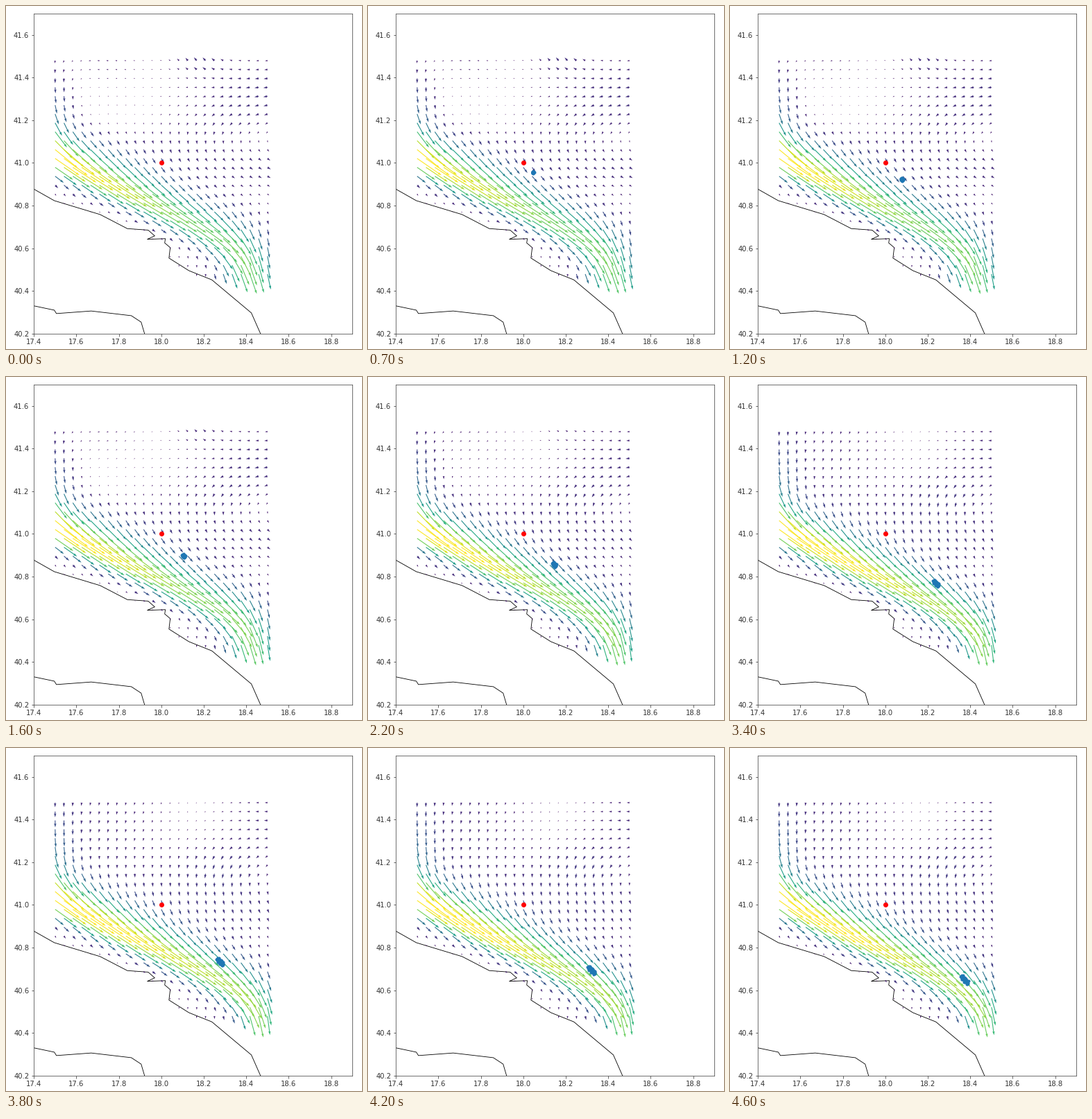
A matplotlib script that plays this animation: 513x495 px, repeating every 4700 ms.

```python
import numpy as np
import matplotlib.pyplot as plt
from matplotlib.animation import FuncAnimation
from matplotlib.path import Path

W, H, DPI = 513, 495, 72
FRAMES, STEP = 47, 100
LEFT, BASE, SPAN_X, SPAN_Y = 40.2, 472.8, 459, 462
LON0, LAT0, SIZE = 17.4, 40.2, 1.5

COAST = [(17.4, 40.877), (17.496, 40.823), (17.712, 40.758), (17.84, 40.692),
         (17.938, 40.685), (17.969, 40.658), (17.934, 40.642),
         (18.019, 40.645), (18.016, 40.625), (18.042, 40.603),
         (18.036, 40.554), (18.13, 40.495), (18.238, 40.452),
         (18.424, 40.297), (18.467, 40.2)]
GULF = [(17.4, 40.33), (17.496, 40.31), (17.506, 40.294), (17.67, 40.306),
        (17.859, 40.284), (17.905, 40.254), (17.921, 40.2)]


def to_geo(x, y):
    """Stage pixels (y down) to longitude and latitude."""
    return (LON0 + (x - LEFT) * SIZE / SPAN_X,
            LAT0 + (BASE - y) * SIZE / SPAN_Y)


def to_stage(lon, lat):
    return (LEFT + (lon - LON0) * SPAN_X / SIZE
            + 1j * (BASE - (lat - LAT0) * SPAN_Y / SIZE))


def mix(a, b, w):
    return a + (b - a) * w


# Sea points of a 1/24 degree grid
steps = np.arange(25) / 24
gu, gv = (a.ravel() for a in np.meshgrid(steps, steps))
lon, lat = 17.5 + gu, 41.479 - gv
land = Path(COAST + [(LON0, LAT0)])
sea = ~land.contains_points(np.column_stack([lon, lat + 0.005]))
gu, gv, lon, lat = gu[sea], gv[sea], lon[sea], lat[sea]
grid = to_stage(lon, lat)


def bump(u, v, su, sv):
    return np.exp(-((gu - u) / su) ** 2 / 2 - ((gv - v) / sv) ** 2 / 2)


# Weak surrounding currents as right + down * 1j, in pixels
common = ((1 + 10j) * bump(0, .22, .07, .16)
          + (1 + 4j) * bump(1, .87, .2, .13)
          + (-.5 + 3j) * bump(.75, .95, .2, .15)
          + (1 + 2j) * bump(.1, .62, .15, .06))
early = common + (-3 * bump(.22, 0, .15, .1)
                  + (-2 - 5j) * bump(.68, 0, .1, .06)
                  + (-6 + .5j) * bump(1, .15, .3, .15)
                  + (-1 + 3j) * bump(.75, .3, .2, .1)
                  + (2 + 4j) * bump(.45, .43, .3, .1)
                  + (5 + 2j) * bump(1, .5, .25, .1))
late = common + ((-1 + 5j) * bump(.25, .1, .25, .25)
                 - 5 * bump(1, .1, .2, .15)
                 + (-2 + 4j) * bump(.8, .28, .15, .08)
                 + (1 + 5j) * bump(.65, .45, .3, .13)
                 + (2 + 3j) * bump(1, .5, .2, .1))

S = np.arange(0, 460, 1.5)


def flow(w):
    """Coastal jet along a bending centre line, plus the weak currents."""
    bend = 1 / (1 + np.exp((mix(325, 355, w) - S) / mix(14, 18, w)))
    heading = np.radians(mix(26, mix(66, 86, w), bend))
    axis = 40 + 203j + 1.5 * np.cumsum(np.exp(1j * heading))
    force = 41 - 17 * (S / 420) ** mix(1, 2.2, w)

    gap = grid[:, None] - axis
    near = abs(gap).argmin(axis=1)
    gap = gap[np.arange(len(near)), near]
    inshore = (np.exp(-1j * heading[near]) * gap).imag > 0
    dist = abs(gap)
    inner = 17 + mix(11, 4, w) * bend[near]
    width = np.where(inshore, inner, 29)
    # Offshore water veers towards the coast
    veer = np.radians(4) + np.where(inshore, 0, 0.006 * np.minimum(dist, 60))
    jet = force[near] * np.exp(-0.5 * (dist / width) ** 2)
    return jet * np.exp(1j * (heading[near] + veer)) + mix(early, late, w)


rng = np.random.default_rng(4)
cloud = np.clip(rng.normal(size=(2, 80)), -2.1, 2.1)


def particles(t):
    """Drifting cloud that speeds up and stretches along its path."""
    mid = 224 + 226j + (20 + 20j) * t + (4.8 + 3.5j) * t * (t / 4.6) ** 4
    along, across = 0.8 * t, 1.4 * (1 - np.exp(-t))
    p = mid + (along * cloud[0] + 1j * across * cloud[1]) * np.exp(0.85j)
    return np.column_stack(to_geo(p.real, p.imag))


fig = plt.figure(figsize=(W / DPI, H / DPI), dpi=DPI, facecolor="white")
ax = fig.add_axes([LEFT / W, 1 - BASE / H, SPAN_X / W, SPAN_Y / H])
ax.set_xlim(LON0, LON0 + SIZE)
ax.set_ylim(LAT0, LAT0 + SIZE)
ax.set_xticks(np.arange(17.4, 18.85, 0.2))
ax.set_yticks(np.arange(40.2, 41.65, 0.2))
ax.xaxis.set_major_formatter("{x:.1f}")
ax.yaxis.set_major_formatter("{x:.1f}")
ax.tick_params(color="0.25", labelcolor="0.2")
ax.spines[:].set_color("0.3")

for line in (COAST, GULF):
    ax.plot(*zip(*line), color="black", lw=0.85)
first = flow(0)
arrows = ax.quiver(lon, lat, first.real, -first.imag, abs(first),
                   cmap="viridis", scale=1, scale_units="dots",
                   units="width", width=0.0024, zorder=2)
arrows.set_clim(0, 41)
dots = ax.scatter(*particles(0).T, s=9, color="tab:blue", zorder=4)
ax.scatter([18], [41], s=36, color="red", zorder=5)


def update(n):
    t = n * STEP / 1000
    k = np.clip((t - 0.5) / 3.7, 0, 1)
    v = flow(k * k * (3 - 2 * k))
    arrows.set_UVC(v.real, -v.imag, abs(v))
    dots.set_offsets(particles(t))
    return arrows, dots


anim = FuncAnimation(fig, update, frames=FRAMES, interval=STEP, repeat=True,
                     repeat_delay=0, blit=False)
plt.show()
```
